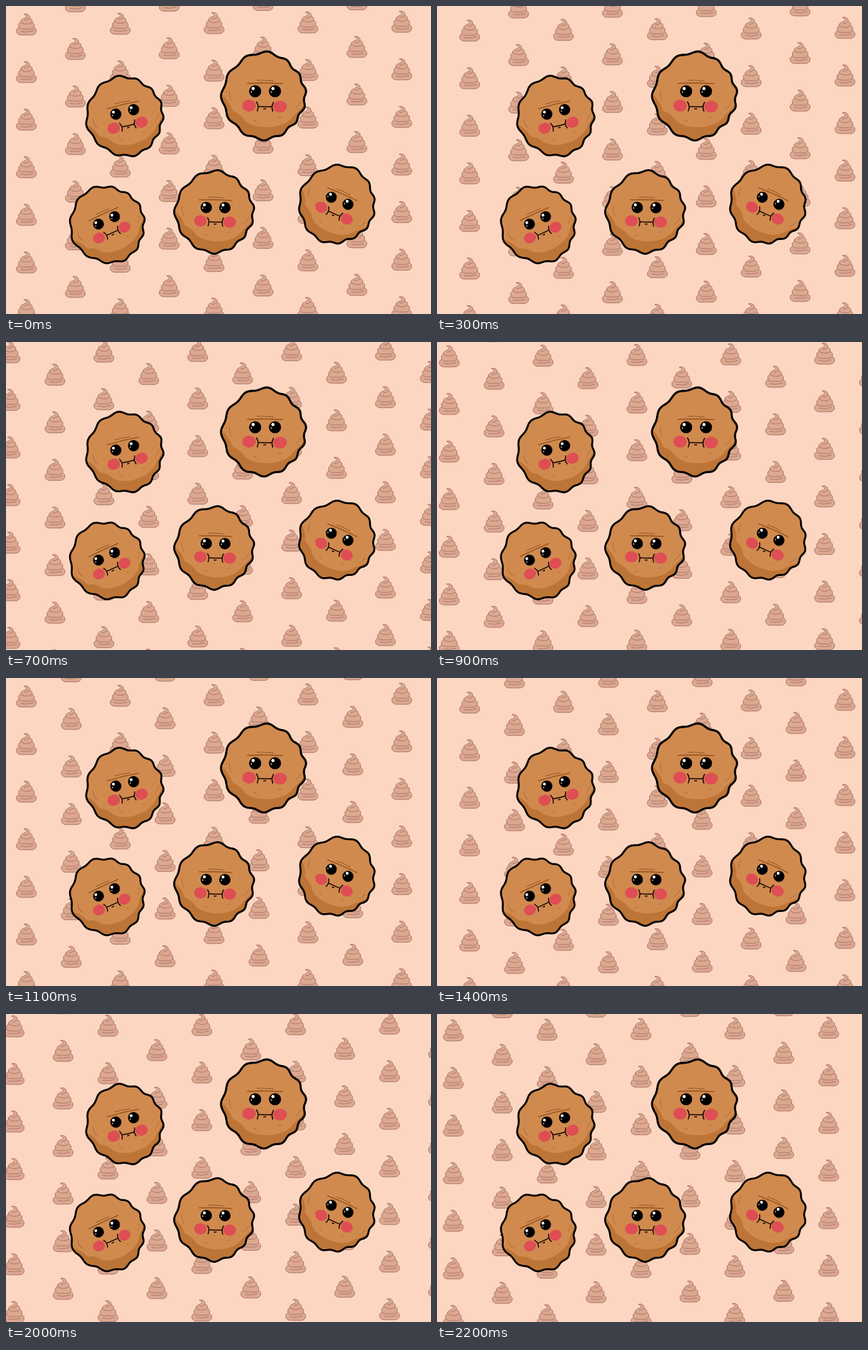
Recreate the animation shown at these times as an HTML page. Size 625 by 453 pixels, loop 2300 ms.

```html
<!DOCTYPE html>
<html lang="en">
<head>
<meta charset="utf-8">
<title>Cookies</title>
<style>
  html, body { margin: 0; width: 100%; height: 100%; overflow: hidden; background: #fcd6c1; }
  svg { display: block; width: 625px; height: 453px; }
</style>
</head>
<body>
<svg viewBox="0 0 625 453">
  <defs>
    <g id="swirl" fill="#dda790" stroke="#a8796b" stroke-linecap="round" stroke-linejoin="round">
      <rect x="-14.700" y="3.500" width="29.400" height="12.200" rx="7" ry="6"/>
      <rect x="-11.700" y="-3.500" width="23.400" height="10.500" rx="5.500"/>
      <path d="M-8.500-4C-9-8-3-8.500-.5-10.500C1-12.500-1-14-4-14.800C1-17 6-13 4.500-9C8-8.500 9.500-5.500 8-2.800C5 .5-6 .5-8.500-4Z"/>
      <path fill="none" d="M-3-6Q1-6 4.500-9M-8 10.500Q0 12.500 10 9.500"/>
    </g>
    <clipPath id="inside"><path class="outline"/></clipPath>
    <g id="eye">
      <circle r="8.900"/>
      <circle cx="-3" cy="-4" r="2.300" fill="#fff"/>
      <circle cx="-5.500" cy="1" r="0.900" fill="#fff"/>
    </g>
    <g id="cookie" stroke-linecap="round" stroke-linejoin="round">
      <path class="outline" fill="#d18a4e"/>
      <path fill="#bd7537" clip-path="url(#inside)" d="M-66-4Q-52 4-46 22Q-34 26-27 37Q-14 47 6 46Q34 45 45 28Q54 20 66 5V80H-66Z"/>
      <g fill="none" stroke="#8d501f">
        <path stroke-width="1.400" d="M-24-18.500Q2-19.500 28-18"/>
        <path stroke-width="0.900" d="M-10-23Q3-23.500 14-22"/>
        <path stroke="#b06b31" d="M-50-8Q-52 0-47 7M54 9Q51 16 46 19M-15 36l4 1M21 32l4-1"/>
      </g>
      <g fill="#de4e54">
        <ellipse cx="-21.500" cy="14.300" rx="10" ry="8.800"/>
        <ellipse cx="24" cy="15.800" rx="10" ry="8.800"/>
      </g>
      <use href="#eye" x="-12.600" y="-6.800"/>
      <use href="#eye" x="16.600" y="-6.800"/>
      <path fill="none" stroke="#100704" stroke-width="1.600" d="M-10.500 9Q-6.500 15-9.500 22M14.500 9.500Q10.500 16 13.500 22.500M-8 15.500Q2 16.300 11.500 15.800M0 19h3"/>
      <path class="outline" fill="none" stroke="#000" stroke-width="3.100"/>
    </g>
  </defs>
  <g id="pattern"></g>
  <g id="cookies"></g>
</svg>
<script>
const { cos, sin, PI } = Math;
const pattern = document.getElementById("pattern");
const cookies = document.getElementById("cookies");

// A slightly tall diamond-like round with 13 unevenly spaced bumps
function rimRadius(angle) {
  const phase = angle + 1.650 + 0.175 * cos(angle - 1.850);
  return 61.300 + 1.200 * cos(4 * angle) - 1.400 * cos(2 * angle) + 1.700 * cos(13 * phase);
}

function rimPath(count = 180) {
  const points = Array.from({ length: count }, (_, i) => {
    const angle = 2 * PI * i / count, r = rimRadius(angle);
    return `${(r * cos(angle)).toFixed(2)} ${(r * sin(angle)).toFixed(2)}`;
  });
  return `M${points.join("L")}Z`;
}

function place(parent, id, transform) {
  const use = document.createElementNS("http://www.w3.org/2000/svg", "use");
  use.setAttribute("href", "#" + id);
  use.setAttribute("transform", transform);
  parent.append(use);
}

const rim = rimPath();
document.querySelectorAll(".outline").forEach(path => path.setAttribute("d", rim));

for (let col = -2; col < 5; col++) {
  for (let row = -2; row < 7; row++) {
    const x = 30 + 138 * col, y = 27 - col + 70 * row;
    place(pattern, "swirl", `translate(${x} ${y})`);
    place(pattern, "swirl", `translate(${x + 72} ${y + 36})`);
  }
}

[
  { x: 174.300, y: 162.200, turn: -14, size: 0.920 },
  { x: 379, y: 132.200, turn: 0, size: 1 },
  { x: 148.800, y: 321.500, turn: -25, size: 0.895 },
  { x: 306.300, y: 302.800, turn: 0.500, size: 0.940 },
  { x: 486.500, y: 291.500, turn: 23, size: 0.910 }
].forEach(({ x, y, turn, size }) =>
  place(cookies, "cookie", `translate(${x} ${y}) rotate(${turn}) scale(${size})`));

// The pattern drifts in 23 steps of 100 ms, ending one tile further on
function draw(time) {
  const step = Math.floor(time / 100) % 23;
  pattern.setAttribute("transform", `translate(${6 * step} ${3 * step})`);
}

const start = performance.now();
function tick() {
  draw(performance.now() - start);
  requestAnimationFrame(tick);
}
draw(0);
requestAnimationFrame(tick);
</script>
</body>
</html>
```
